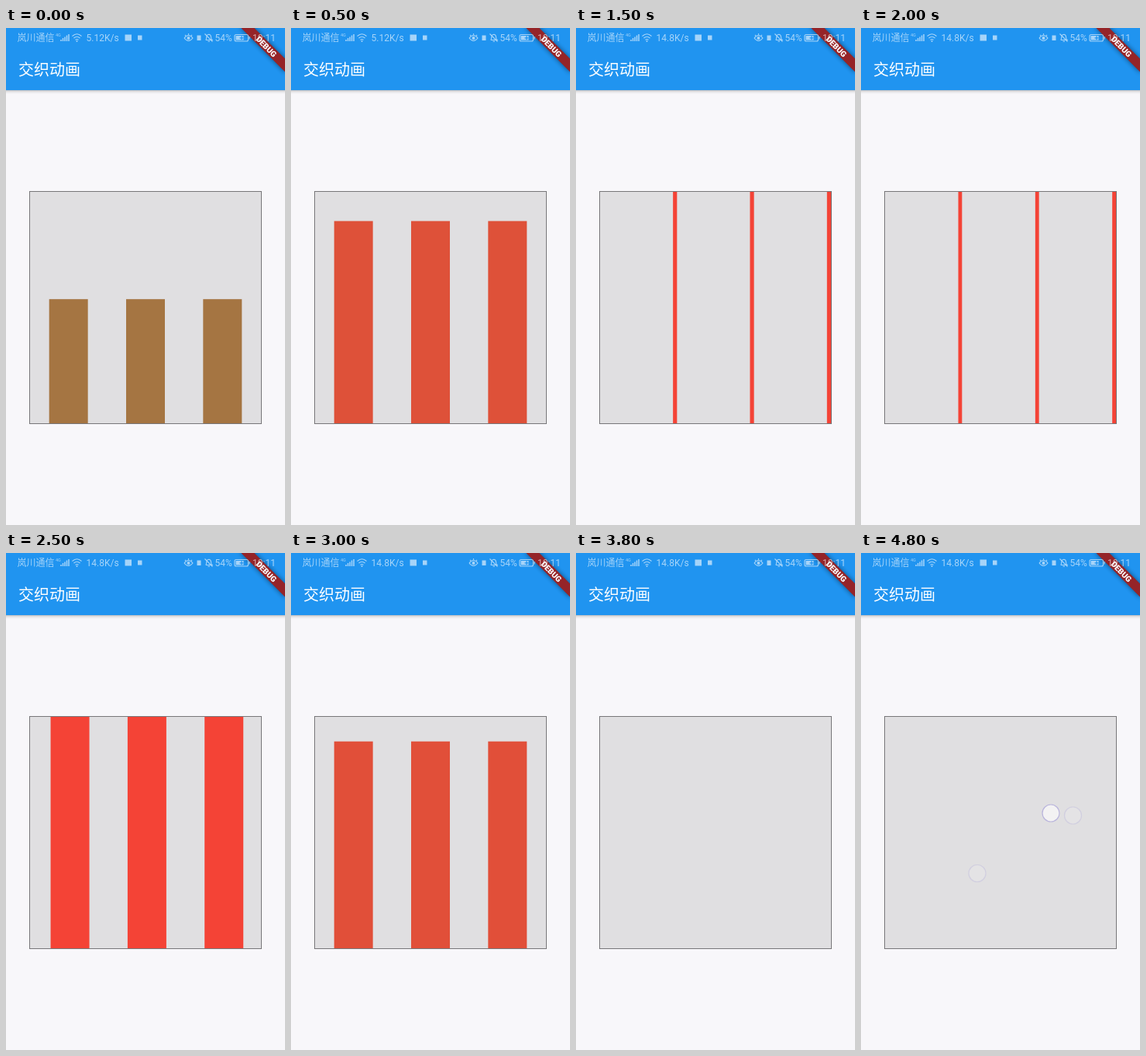
An HTML page that plays this animation: 360x640 px, repeating every 4900 ms.

```html
<!DOCTYPE html>
<html lang="zh">
<head>
<meta charset="utf-8">
<style>
  html, body { margin: 0; width: 100%; height: 100%; overflow: hidden; background: #f8f7fa; }
  svg { display: block; width: 360px; height: 640px; }
  text { font: 12px Roboto, sans-serif; fill: #fff; }
  .cjk { font-family: "Noto Sans CJK SC", "Noto Sans CJK", sans-serif; }
  .title { font-size: 20px; font-weight: 500; }
  .line { fill: none; stroke: #fff; stroke-width: 1.1; }
  .touch { fill: #fff; fill-opacity: .6; stroke: #b9b4dc; stroke-width: 1.2; }
  .faint { fill-opacity: .14; stroke-opacity: .42; }
</style>
</head>
<body>
<svg viewBox="0 0 360 640">
  <defs>
    <linearGradient id="shade" x2="0" y2="1">
      <stop stop-opacity=".24"/><stop offset=".4" stop-opacity=".08"/><stop offset="1" stop-opacity="0"/>
    </linearGradient>
    <filter id="blur" x="-20%" y="-80%" width="140%" height="260%"><feGaussianBlur stdDeviation="3"/></filter>
  </defs>
  <rect width="360" height="640" fill="#f8f7fa"/>
  <rect y="80" width="360" height="5" fill="url(#shade)"/>
  <rect width="360" height="80" fill="#2094f0"/>
  <text class="cjk title" x="16" y="60.5">交织动画</text>

  <rect x="30.5" y="210.5" width="299" height="299" fill="#e0dfe1" stroke="#777679"/>
  <g id="bars"></g>
  <g id="touches"></g>

  <g transform="translate(360) rotate(45)">
    <rect x="-40" y="28" width="80" height="12" opacity=".5" filter="url(#blur)"/>
    <rect x="-40" y="28" width="80" height="12" fill="#952428"/>
    <text y="37.6" text-anchor="middle" style="font-size:10.2px;font-weight:900">DEBUG</text>
  </g>

  <!-- Status bar -->
  <g opacity=".6">
    <text class="cjk" x="14.5" y="17">岚川通信</text>
    <text x="64" y="11" style="font-size:5.5px">4G</text>
    <path class="line" style="stroke-width:1.5" d="M71 17v-2M73.5 17v-4M76 17v-5.500M78.500 17v-7.500M81 17v-9"/>
    <path class="line" d="M85.500 10.500q6-5.500 12 0M87.500 13q4-3.500 8 0M89.500 15.300q2-1.700 4 0"/>
    <circle cx="91.500" cy="17" r="1" fill="#fff"/>
    <text id="speed" x="103.500" y="17"></text>
    <rect x="153.500" y="8.500" width="8.500" height="8" fill="#fff"/>
    <rect x="170" y="9.500" width="5.500" height="6" fill="#fff"/>
    <path class="line" d="M230 13q5.500-7 11 0q-5.500 7-11 0M231 9l1.300 1.300M235.500 7v1.700M240 9l-1.300 1.300"/>
    <circle cx="235.500" cy="13" r="2" fill="#fff"/>
    <rect x="246.500" y="9.500" width="5" height="6.500" fill="#fff"/>
    <path class="line" d="M258 15.500h8q-1.500-1.500-1.500-4q0-3-2.800-3.300q-3 .3-3 4q0 2-1 3.300M260.500 17.300h2.500M256.500 7.500l10 10"/>
    <text x="269.500" y="17">54%</text>
    <rect class="line" x="295" y="8.500" width="17.500" height="8.500" rx="2"/>
    <path d="M313.500 11h1.300v3.500h-1.300zM296.500 10h10v5.500h-10z" fill="#fff"/>
    <path d="M301.500 12.800h5M304 10.300v5" stroke="#2094f0" stroke-width="1.300"/>
    <text x="318" y="17">10:11</text>
  </g>
</svg>
<script>
const LOOP = 4900, STEP = 100, DURATION = 2000;
const GREEN = [76, 175, 80], RED = [244, 67, 54];
const CELL = 298 / 3;
// Playback time -> time within the forward and reverse run
const CLOCK = [[0, 372], [500, 691], [1100, 1385], [2000, 2232], [2500, 2756], [3300, 3587], [3700, 4000]];
const TAPS = [[4400, 150, 412.5], [4600, 273.5, 338], [4800, 245, 335]];
const $ = id => document.getElementById(id);

function add(parent, tag, attrs) {
  const el = document.createElementNS('http://www.w3.org/2000/svg', tag);
  set(el, attrs);
  return parent.appendChild(el);
}
function set(el, attrs) {
  for (const key in attrs) el.setAttribute(key, attrs[key]);
}
const bars = [0, 1, 2].map(() => add($('bars'), 'rect', {}));
const touches = TAPS.map(([, cx, cy]) => add($('touches'), 'circle', { cx, cy, r: 11 }));

function runTime(t) {
  const i = CLOCK.findIndex(([at]) => at > t);
  if (i < 0) return 2 * DURATION;
  const [t0, v0] = CLOCK[i - 1], [t1, v1] = CLOCK[i];
  return v0 + (v1 - v0) * (t - t0) / (t1 - t0);
}

// cubic-bezier(.25, .1, .25, 1)
function ease(x) {
  if (x <= 0) return 0;
  if (x >= 1) return 1;
  const curve = (s, a, b) => 3 * (1 - s) ** 2 * s * a + 3 * (1 - s) * s * s * b + s ** 3;
  let lo = 0, hi = 1;
  for (let i = 0; i < 24; i++) {
    const mid = (lo + hi) / 2;
    if (curve(mid, .25, .25) < x) lo = mid; else hi = mid;
  }
  return curve(lo, .1, 1);
}

function draw(t) {
  const run = runTime(t);
  const progress = 1 - Math.abs(run / DURATION - 1);
  const grow = ease(progress / .6);
  const pad = 100 * ease((progress - .6) / .4);
  const height = Math.min(298, 300 * grow);
  const width = Math.max(0, Math.min(50, CELL - pad));
  const inset = pad + Math.max(0, CELL - pad - width) / 2;
  const fill = `rgb(${GREEN.map((g, i) => Math.round(g + (RED[i] - g) * grow))})`;
  bars.forEach((bar, i) => set(bar, { x: 31 + i * CELL + inset, y: 509 - height, width, height, fill }));

  const latest = TAPS.filter(([at]) => at <= t).length - 1;
  touches.forEach((dot, i) => set(dot, {
    class: i === latest ? 'touch' : 'touch faint',
    visibility: i <= latest ? 'visible' : 'hidden'
  }));
  $('speed').textContent = t < 1500 ? '5.12K/s' : '14.8K/s';
}

const start = performance.now();
function tick() {
  const t = (performance.now() - start) % LOOP;
  draw(Math.floor(t / STEP) * STEP);
  requestAnimationFrame(tick);
}
tick();
</script>
</body>
</html>
```
